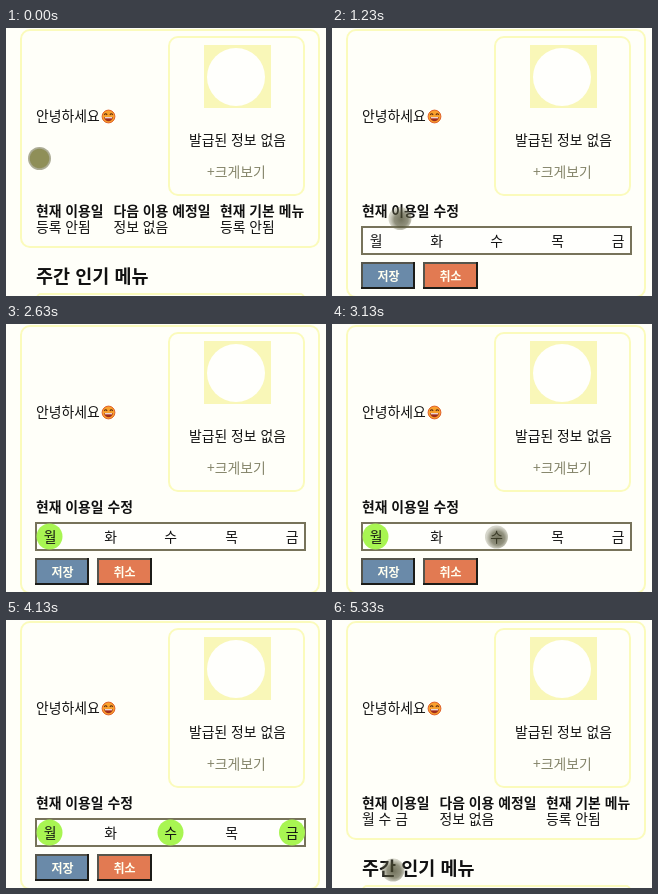
An HTML page for the animation above (7.16 s loop, 320 px wide and 268 px high).

```html
<!DOCTYPE html>
<html lang="ko">
<head>
<meta charset="utf-8">
<style>
  html, body { margin: 0; width: 100%; height: 100%; overflow: hidden; background: #fffff9; }
  svg { display: block; width: 320px; height: 268px; font: 13.85px "Noto Sans CJK KR", "Noto Sans CJK", sans-serif; fill: #111; }
  .b { font-weight: 700; }
  .card { fill: none; stroke: #fbfbbc; stroke-width: 2; }
  .btn { font: 700 12px "Noto Sans CJK KR", "Noto Sans CJK", sans-serif; fill: #fffff0; text-anchor: middle; }
  .days { text-anchor: middle; }
</style>
</head>
<body>
<svg viewBox="0 0 320 268">
  <defs>
    <radialGradient id="touch" cx=".55" cy=".55">
      <stop offset="0" stop-color="#45452a" stop-opacity=".75"/>
      <stop offset=".6" stop-color="#55553a" stop-opacity=".65"/>
      <stop offset="1" stop-color="#77775c" stop-opacity=".3"/>
    </radialGradient>
    <radialGradient id="rest">
      <stop offset=".8" stop-color="#8f8f58"/>
      <stop offset=".9" stop-color="#acac96"/>
    </radialGradient>
  </defs>

  <rect id="card" class="card" x="15" y="2" width="298" rx="9"/>
  <rect class="card" x="163" y="9" width="135" height="158" rx="9"/>
  <rect x="198" y="17" width="67" height="63" fill="#f9f7b8"/>
  <circle cx="230" cy="49" r="29" fill="#fffffc"/>
  <text x="30" y="93">안녕하세요</text>
  <g transform="translate(102.5 88.5)">
    <circle r="6.4" fill="#f9a02c" stroke="#e0622c"/>
    <path d="M-4.3 .4H4.3A4.3 4.3 0 0 1-4.3 .4Z" fill="#a02c1c"/>
    <path d="M-3.6 .7H3.6V1.8H-3.6Z" fill="#fff"/>
    <path d="M-4.2-1.6q1.4-2.4 2.8 0M1.4-1.6q1.4-2.4 2.8 0" fill="none" stroke="#5c2a10" stroke-width="1.1"/>
  </g>
  <text x="183" y="117">발급된 정보 없음</text>
  <text x="201" y="149" fill="#85856a">+크게보기</text>

  <g id="view">
    <g class="b">
      <text x="30" y="188">현재 이용일</text>
      <text x="107.5" y="188">다음 이용 예정일</text>
      <text x="214" y="188">현재 기본 메뉴</text>
      <text x="30" y="255" font-size="18.5">주간 인기 메뉴</text>
    </g>
    <text id="using" x="30" y="204"></text>
    <text x="107.5" y="204">정보 없음</text>
    <text x="214" y="204">등록 안됨</text>
    <rect class="card" x="31" y="266" width="267" height="40" rx="4"/>
  </g>

  <g id="edit">
    <text class="b" x="30" y="188">현재 이용일 수정</text>
    <rect x="30" y="199" width="269" height="27" fill="#fffffc" stroke="#77735a" stroke-width="2"/>
    <g id="marks" fill="#a8f552">
      <circle cx="43.5" cy="212.5" r="13"/>
      <circle cx="164.5" cy="212.5" r="13"/>
      <circle cx="286" cy="212.5" r="13"/>
    </g>
    <g class="days">
      <text x="44" y="218">월</text>
      <text x="104.5" y="218">화</text>
      <text x="164.5" y="218">수</text>
      <text x="225.5" y="218">목</text>
      <text x="286" y="218">금</text>
    </g>
    <g fill="none" stroke-width="2">
      <rect x="30" y="235" width="52" height="25" fill="#6a8aa9" stroke="#55554c"/>
      <path d="M29 260H82V234" stroke="#1c1c18"/>
      <rect x="92" y="235" width="53" height="25" fill="#e27a52" stroke="#55554c"/>
      <path d="M91 260H145V234" stroke="#1c1c18"/>
    </g>
    <text class="btn" x="56.5" y="253">저장</text>
    <text class="btn" x="118.5" y="253">취소</text>
  </g>

  <circle id="cursor" r="11.5"/>
</svg>
<script>
const LOOP = 7160, OPEN = 1070, SAVE = 5300;
const $ = id => document.getElementById(id);
const marks = [...$('marks').children];
const fades = [[2170, 2420], [3130, 3370], [3930, 4130]];

// Visible spans of the touch cursor: start, end, from x, y, to x, y, fill
const touches = [
  [0, 400, 33.5, 130.5, 33.5, 130.5, 'rest'],
  [930, 1600, 68, 190.5, 68, 190.5],
  [1800, 2000, 70, 213, 70, 213],
  [2000, 2400, 49.5, 213, 49.5, 213],
  [2400, 2630, 49.5, 213, 121, 225],
  [2930, 3130, 153, 214, 164.5, 213],
  [3130, 3330, 164.5, 213, 164.5, 213],
  [3730, 3930, 267, 216, 267, 216],
  [3930, 4090, 286, 213, 286, 213],
  [4870, LOOP, 61, 250, 61, 250]
];

const progress = (t, a, b) => Math.min(1, Math.max(0, (t - a) / (b - a)));
const show = (el, on) => el.setAttribute('visibility', on ? 'visible' : 'hidden');

function draw(now) {
  const t = now % LOOP;
  const editing = t >= OPEN && t < SAVE;
  show($('edit'), editing);
  show($('view'), !editing);
  $('card').setAttribute('height', editing ? 267 : 217);
  $('using').textContent = t < OPEN ? '등록 안됨' : '월 수 금';
  marks.forEach((m, i) => m.setAttribute('opacity', progress(t, ...fades[i])));

  const touch = touches.find(([a, b]) => t >= a && t < b);
  show($('cursor'), touch);
  if (touch) {
    const [a, b, x, y, x2, y2, fill = 'touch'] = touch, p = progress(t, a, b);
    $('cursor').setAttribute('cx', x + (x2 - x) * p);
    $('cursor').setAttribute('cy', y + (y2 - y) * p);
    $('cursor').setAttribute('fill', `url(#${fill})`);
  }
  requestAnimationFrame(draw);
}
draw(0);
</script>
</body>
</html>
```
